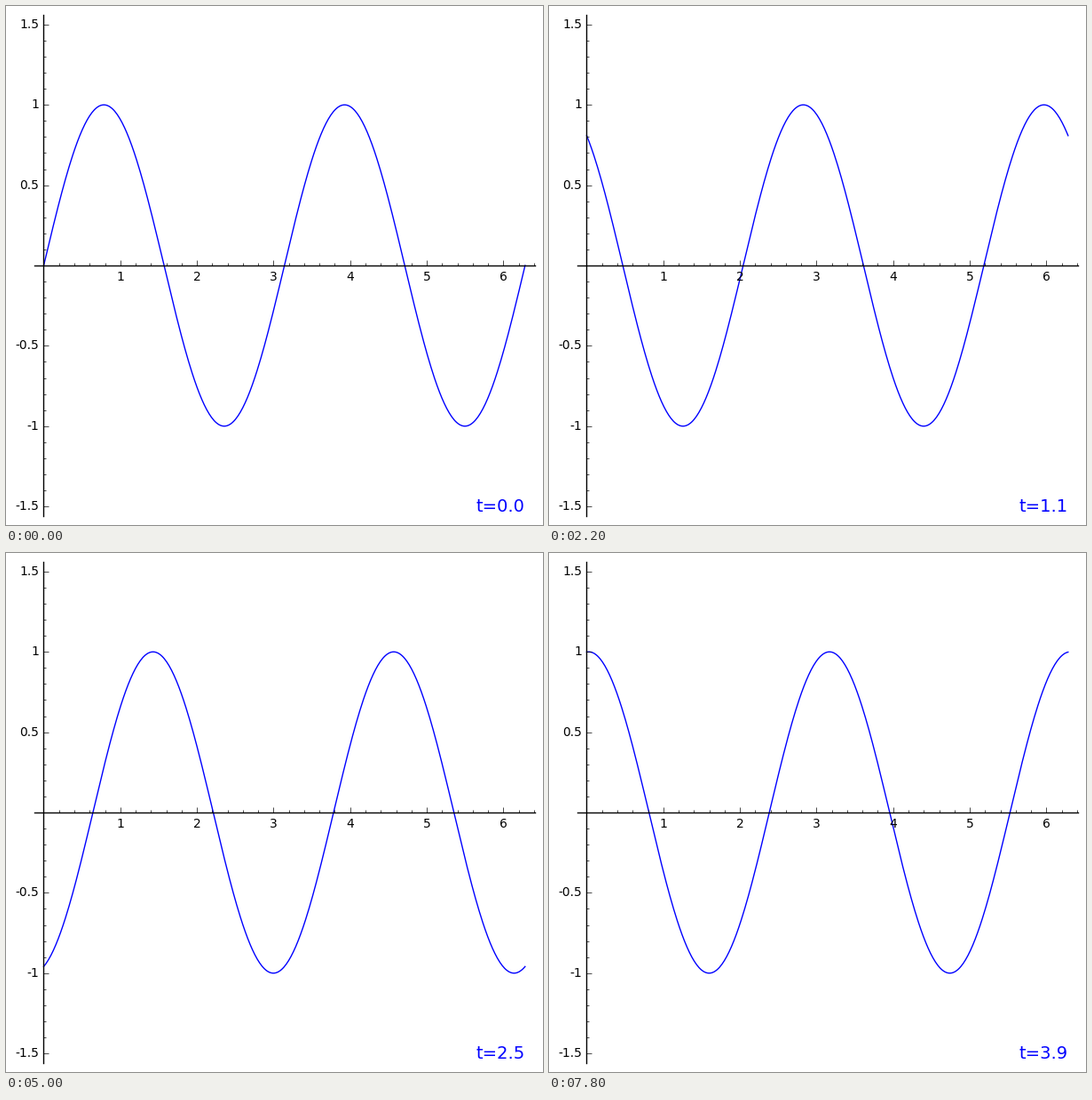
These frames come from a looping animation (605 px wide and 584 px high, 8 s). A matplotlib script:

```python
import numpy as np
import matplotlib.pyplot as plt
from matplotlib.animation import FuncAnimation

W, H, DPI = 605, 584, 100
LEFT, TOP, SIDE = 31.65, 10, 564
FRAMES, STEP_MS = 40, 200
X_END, Y_END = 2 * np.pi, 1.5
PAD = 0.02

plt.rcParams.update({
    "font.family": "DejaVu Sans",
    "font.size": 10,
    "ytick.alignment": "center",
    "toolbar": "None",
})

fig = plt.figure(figsize=(W / DPI, H / DPI), dpi=DPI, facecolor="white")
ax = fig.add_axes([LEFT / W, (H - TOP - SIDE) / H, SIDE / W, SIDE / H])
ax.set_xlim(-PAD * X_END, (1 + PAD) * X_END)
ax.set_ylim(-Y_END * (1 + 2 * PAD), Y_END * (1 + 2 * PAD))
ax.set_axisbelow(False)


def style_axes():
    for side in ("top", "right"):
        ax.spines[side].set_visible(False)
    for side in ("left", "bottom"):
        ax.spines[side].set_position("zero")
        ax.spines[side].set_linewidth(1.0)

    xs = np.arange(1, 7)
    ys = [y for y in np.arange(-1.5, 1.6, 0.5) if y != 0]
    ax.set_xticks(xs, [f"{x:g}" for x in xs])
    ax.set_yticks(ys, [f"{y:g}" for y in ys])
    ax.set_xticks(np.arange(1, 33) * 0.2, minor=True)
    ax.set_yticks(np.arange(-15, 16) * 0.1, minor=True)

    ax.tick_params(which="both", direction="in", width=0.5, pad=4,
                   top=False, right=False)
    ax.tick_params(which="major", length=4)
    ax.tick_params(which="minor", length=2)


style_axes()
x = np.linspace(0, X_END, 400)
wave, = ax.plot(x, np.sin(2 * x), color="blue", lw=1.0)
clock = ax.text(X_END, -Y_END, "t=0.0", color="blue", fontsize=14,
                ha="right", va="center")


def update(i):
    t = i / 10
    wave.set_ydata(np.sin(2 * (x + t)))
    clock.set_text(f"t={t:.1f}")
    return wave, clock


anim = FuncAnimation(fig, update, frames=FRAMES, interval=STEP_MS,
                     repeat=True, repeat_delay=0, blit=False)
plt.show()
```
